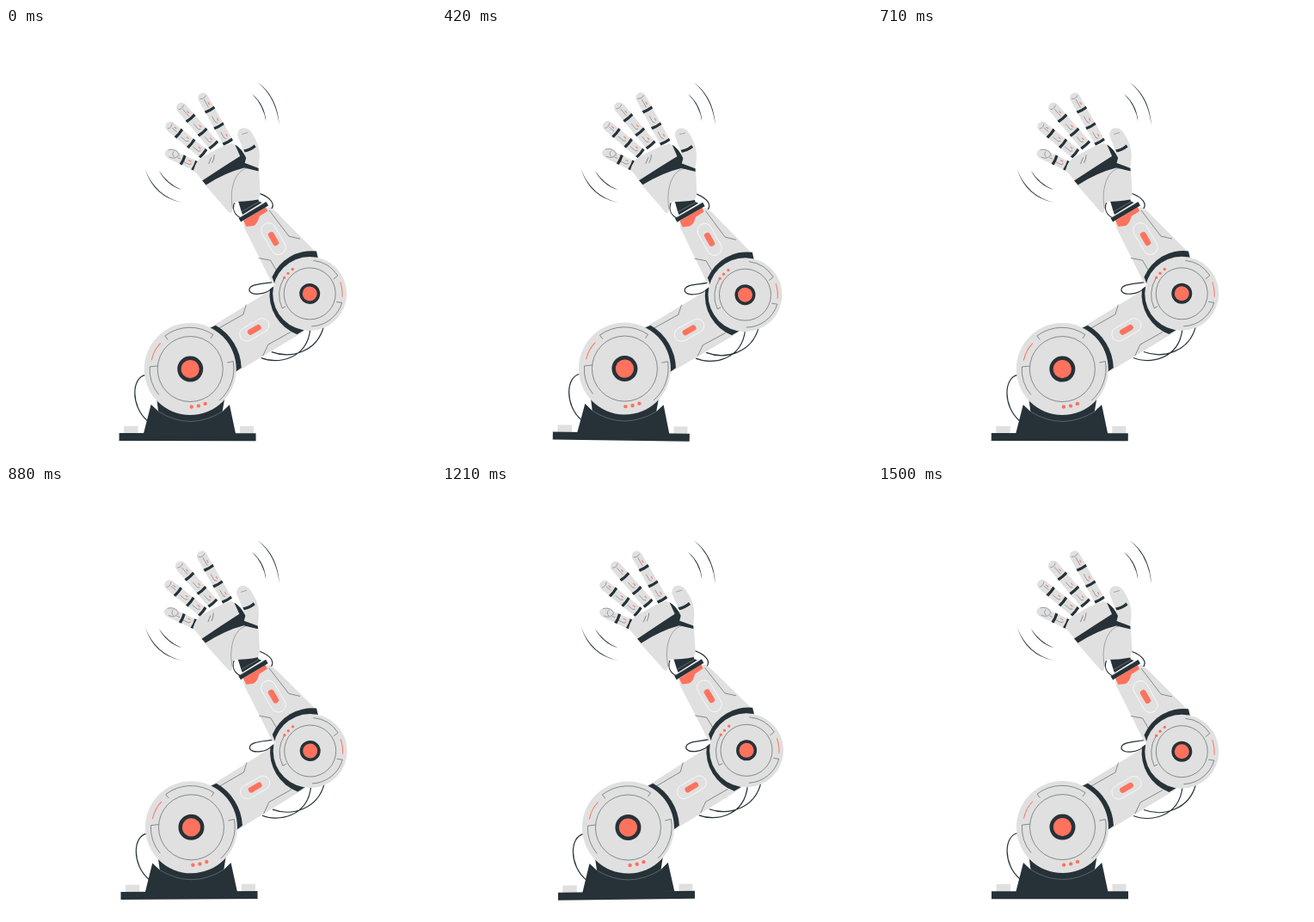
Animation, 500 px wide and 500 px high, one loop 1.54 s. Source, as an HTML page:

```html
<!DOCTYPE html>
<html lang="en">
<head>
<meta charset="utf-8">
<title>Waving robot arm</title>
<style>
  html, body { margin: 0; width: 100%; height: 100%; overflow: hidden; background: #fff; }
  svg { display: block; width: 100vw; height: 100vh; }
  .dark { fill: #263238; }
  .grey { fill: #e0e0e0; }
  .coral { fill: #ff725e; }
  .line, .wire, .white, .glow { fill: none; stroke: #263238; stroke-width: .5; }
  .wire { stroke-width: 1.2; }
  .white { stroke: #fff; stroke-width: .7; }
  .glow { stroke: #ff725e; stroke-width: 1; }
  .faint { stroke-width: .35; }
</style>
</head>
<body>
<svg viewBox="0 0 500 500">
  <!-- tapered motion lines -->
  <g class="dark">
    <path d="M292.500 63Q316 80 317.800 113.500Q314.300 81 292.500 63Z"/>
    <path d="M286 76.500Q301 89 302.300 108.500Q299.300 90 286 76.500Z"/>
    <path d="M161.800 164Q172 197 205 203Q173.500 195.500 161.800 164Z"/>
    <path d="M177.700 165.700Q187 183 204.500 188.200Q188.500 181.800 177.700 165.700Z"/>
  </g>

  <g id="robot">
    <!-- cables -->
    <path class="wire" d="M163 403.500C146 406 145 440 165 457"/>
    <path class="wire" d="M297 383.500C315 391 350 386 354 350M309 376.500C332 385 362 376 369.500 347"/>
    <path class="wire" d="M314 294.500C302 298 283 296.500 283 304.500C283 311.500 303 311 311 301"/>
    <path class="wire" d="M265.500 203C263 210 265 217 273 221M294 192C308 197 313.500 205 308 211"/>

    <!-- base -->
    <path class="grey" d="M137.500 463H154V472H137.500ZM272.500 463H288.500V472H272.500Z"/>
    <path class="dark" d="M132 471.200H291V480.200H132Z"/>
    <path class="dark" d="M160.300 472L169 438L177.500 446L175.500 431H254.500L252 446L260.300 438L267.500 472Z"/>
    <path class="line" style="stroke:#8d9598" d="M177.500 446Q214.500 469 252 446"/>

    <!-- lower segment -->
    <path class="grey" d="M238 348L311 303L346 353L270 399Z"/>
    <path class="line" d="M247 349.500L276 333L279.500 321.500M299 381L305 368L331 353.500"/>
    <g transform="translate(289 350.800) rotate(-30)">
      <rect class="white" x="-18.500" y="-8" width="37" height="16" rx="8"/>
      <rect class="coral" x="-8.500" y="-3.300" width="17" height="6.600" rx="3"/>
    </g>
    <path class="dark" d="M237 349L244 345.800A59.500 59.500 0 0 1 274 395L267 400Z"/>
    <path class="dark" d="M313 300L307 303.500A49.500 49.500 0 0 0 338.500 356L347 351Z"/>

    <!-- shoulder joint -->
    <g transform="translate(214.500 396.600)">
      <circle class="grey" r="53.500"/>
      <circle class="line" r="38"/>
      <path class="line" d="M-26 -34L-29.500 -38.500A48 48 0 0 1 26.500 -40L23.500 -35.500"/>
      <path class="line" d="M-38 -3.500L-47 -2.500A47 47 0 0 0 -36.500 30M43 -7.500L50 -9A50 50 0 0 1 34 36.500"/>
      <path class="glow" d="M-45 -10Q-42.500 -22 -34.500 -30"/>
      <circle class="dark" r="15"/>
      <circle class="coral" r="10.600"/>
      <g class="coral"><circle cx="1.600" cy="44" r="2.200"/><circle cx="9.700" cy="42.800" r="2.200"/><circle cx="17.500" cy="40.300" r="2.200"/></g>
    </g>

    <!-- upper segment -->
    <path class="grey" d="M276 226L306 208L313 213L362 262L310 298L277 232Z"/>
    <path class="line" d="M306 212L329 242L342 245M294 267.500L307.500 270L314 281"/>
    <g transform="translate(311 245) rotate(60)">
      <rect class="white" x="-20" y="-8.500" width="40" height="17" rx="8.500"/>
      <rect class="coral" x="-8.500" y="-3.500" width="17" height="7" rx="3"/>
    </g>
    <path class="dark" d="M309.500 289.500A49.500 49.500 0 0 1 361 259.300L363 268L313 299Z"/>

    <!-- elbow joint -->
    <g transform="translate(353.300 308.700)">
      <circle class="grey" r="43"/>
      <circle class="line" r="30"/>
      <path class="line" d="M4 -38.500A38.500 38.500 0 0 1 32.500 -21L27.500 -17M-30 -18A36 36 0 0 0 -32 17L-28 15"/>
      <path class="line" d="M31 9.500L37.500 10.500A38.500 38.500 0 0 1 2 38"/>
      <path class="glow" d="M35.500 -13.500Q38.500 -5 37.800 4"/>
      <circle class="dark" r="12"/>
      <circle class="coral" r="8.500"/>
      <g class="coral"><circle cx="-29.600" cy="-18.500" r="1.700"/><circle cx="-25.300" cy="-23.500" r="1.700"/><circle cx="-20" cy="-28.300" r="1.700"/></g>
    </g>

    <!-- wrist -->
    <path class="coral" d="M276 224L302 208L304 213L294.500 219Q292.500 228 287.500 230L279.500 231Z"/>
    <path class="dark" d="M269 198L292 196L294 201.500L297.500 203L275 217L273.500 213Z"/>
    <path class="dark" d="M270.500 221L302.500 202L305 206.500L273 225.500Z"/>
    <path class="line" style="stroke:#9aa1a5" d="M274 213.500L295 201.500M272.500 220L300 203.500"/>

    <!-- hand -->
    <g id="fingers"></g>
    <path class="grey" d="M218 165Q221 154 228 150L241 143Q252 137 262 134L269 137L273 149Q254 165 229 178Z"/>
    <path class="line" d="M235.500 158L238.500 150.500M239.500 157Q242 152 242 147.500"/>
    <path class="grey" d="M230 181Q252 165 278 159L294 165L295.500 193L293 199.500Q281 202 264.500 202L263 213Q261.500 217 258 213Z"/>
    <path class="grey" d="M269 125C269 114 280 114 285 121C291 131 298 141 293 163L277 160Q280 150 275 140Z"/>
    <path class="line faint" d="M263.500 210C259 188 266 166 280 163M274 123.500L281 121.500"/>
    <path class="dark" d="M276 141.500Q283 140.500 288.500 135.500L290.500 138.500Q284 143.500 277.500 144.500Z"/>
    <path class="dark" d="M228 177.500Q250 163 272 149Q269 142 266 135.500Q274 140 279 151L277.500 157L293.500 163V166.500L277 162.500Q255 168 232.500 182.500Z"/>
  </g>
</svg>
<script>
  const robot = document.getElementById('robot');

  // A finger lies along x from its tip; bands are its dark joints.
  function finger(x, y, angle, bands, half) {
    const end = bands[bands.length - 1], tip = half - .3;
    const body = `<path class="grey" d="M${end} ${-half}L${tip} ${-tip}A${tip} ${tip} 0 0 0 ${tip} ${tip}L${end} ${half}Z"/>
      <path class="line faint" d="M5 -4Q8 0 5 4M8 0H${bands[0] - 3}"/>`;
    const joints = bands.map((b, i) =>
      `<path class="dark" d="M${b - 1.7} ${-half}Q${b - .7} 0 ${b - 1.7} ${half}H${b + 1.6}Q${b + 2.4} 0 ${b + 1.6} ${-half}Z"/>
       <path class="glow" d="M${b - 9} -2.500h3.500"/>` +
      (i ? `<path class="line faint" d="M${b - 14} 1.500h8l2 -2"/>` : '')).join('');
    return `<g transform="translate(${x} ${y}) rotate(${angle})">${body}${joints}</g>`;
  }

  document.getElementById('fingers').innerHTML =
    finger(226, 76, 60.7, [22, 43.5, 64.5], 6.2) +
    finger(200, 88.3, 49.3, [22, 43.5, 63], 6.4) +
    finger(186.4, 111, 39.3, [18.5, 37, 55], 6.2) +
    finger(186, 144.5, 25, [21.5, 36.5], 5.8) +
    `<g transform="rotate(8 193 146)">
       <ellipse class="grey" cx="193" cy="146.500" rx="8.500" ry="5.800"/>
       <path class="line faint" d="M188 142.500Q197 139 201 146Q199 153 190 150.500M195 143Q192 147 196 150"/>
     </g>`;

  const LOOP = 1540, STEP = 1000 / 24, STEPS = 37;

  // Linear swing 0 → 1° → -1° → 0, stepped at 24 per second.
  function draw(now) {
    const step = Math.floor((now % LOOP + 5) / STEP) + 1;
    const angle = Math.asin(Math.sin(2 * Math.PI * step / STEPS)) * 2 / Math.PI;
    robot.setAttribute('transform', `rotate(${angle.toFixed(4)} 250 250)`);
    requestAnimationFrame(draw);
  }
  draw(performance.now());
</script>
</body>
</html>
```
